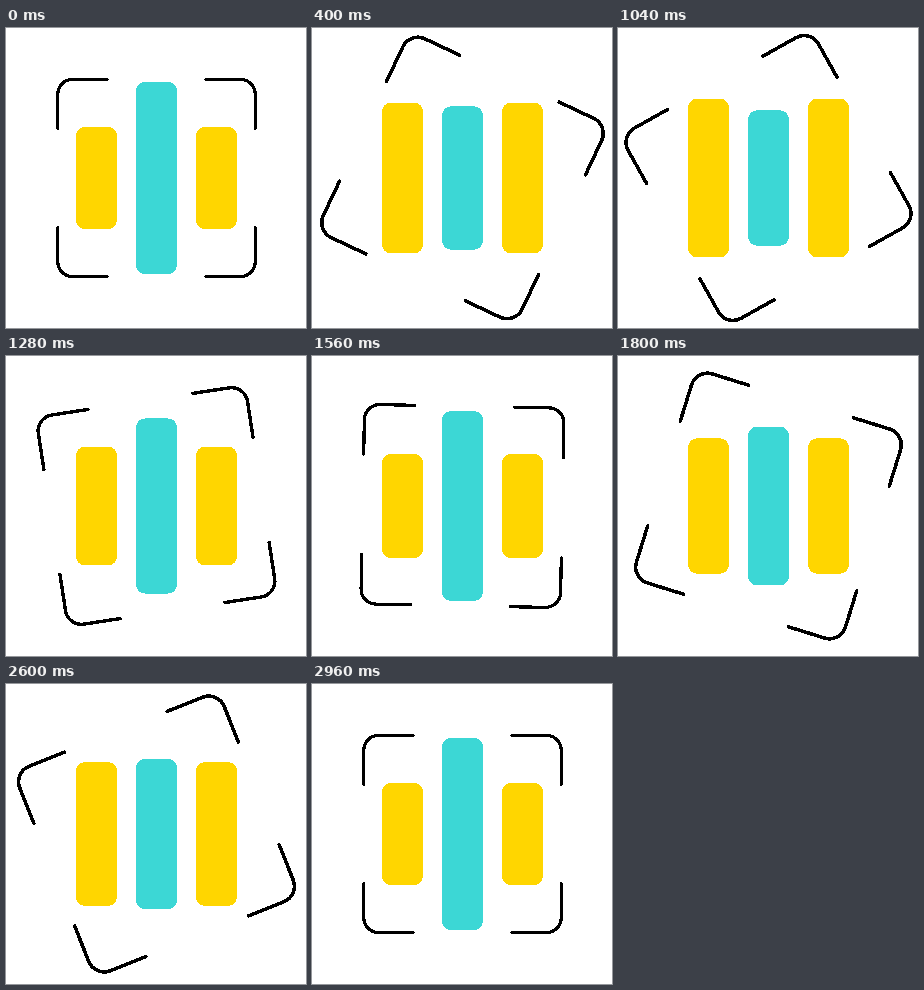
An HTML page that plays this animation: 300x300 px, repeating every 3000 ms.

```html
<!DOCTYPE html>
<html>
<head>
<meta charset="utf-8">
<style>
html, body { margin: 0; width: 100%; height: 100%; overflow: hidden; background: #fff; }
svg { display: block; width: 300px; height: 300px; shape-rendering: crispEdges; }
</style>
</head>
<body>
<svg viewBox="0 0 300 300">
  <g id="frame" fill="none" stroke="#000" stroke-width="3.2" stroke-linecap="round"></g>
  <rect class="side" x="70" width="41" rx="9" fill="#ffd600"/>
  <rect class="side" x="190" width="41" rx="9" fill="#ffd600"/>
  <rect class="mid" x="130" width="41" rx="9" fill="#3cd7d5"/>
</svg>
<script>
const LOOP = 3000, STEP = 40;
const KEYS = [0, 740, 1492, 2222, 2960]; // one eighth turn between keys
const frame = document.getElementById('frame');
const sides = document.querySelectorAll('.side');
const mids = document.querySelectorAll('.mid');

frame.innerHTML = [0, 90, 180, 270].map(a =>
  `<path transform="rotate(${a})" d="M-98.7-49.5V-83.7a15 15 0 0 1 15-15H-49.5"/>`).join('');

const ease = u => u * u * (3 - 2 * u);

function setHeight(bars, h) {
  for (const bar of bars) {
    bar.setAttribute('y', 150 - h / 2);
    bar.setAttribute('height', h);
  }
}

function draw(now) {
  const t = Math.floor(now % LOOP / STEP) * STEP;
  let i = 0;
  while (i < 3 && t >= KEYS[i + 1]) i++;
  const s = ease(Math.min(1, (t - KEYS[i]) / (KEYS[i + 1] - KEYS[i])));
  const open = i % 2 ? 1 - s : s;
  setHeight(mids, 192 - 87 * open);
  setHeight(sides, 102 + 87 * open);
  const scale = 1 + 0.46 * s * (1 - s); // swells halfway through each turn
  frame.setAttribute('transform',
    `translate(150.5 150) rotate(${45 * (i + s)}) scale(${scale})`);
}

const start = performance.now();
function tick() {
  draw(performance.now() - start);
  requestAnimationFrame(tick);
}
tick();
</script>
</body>
</html>
```
